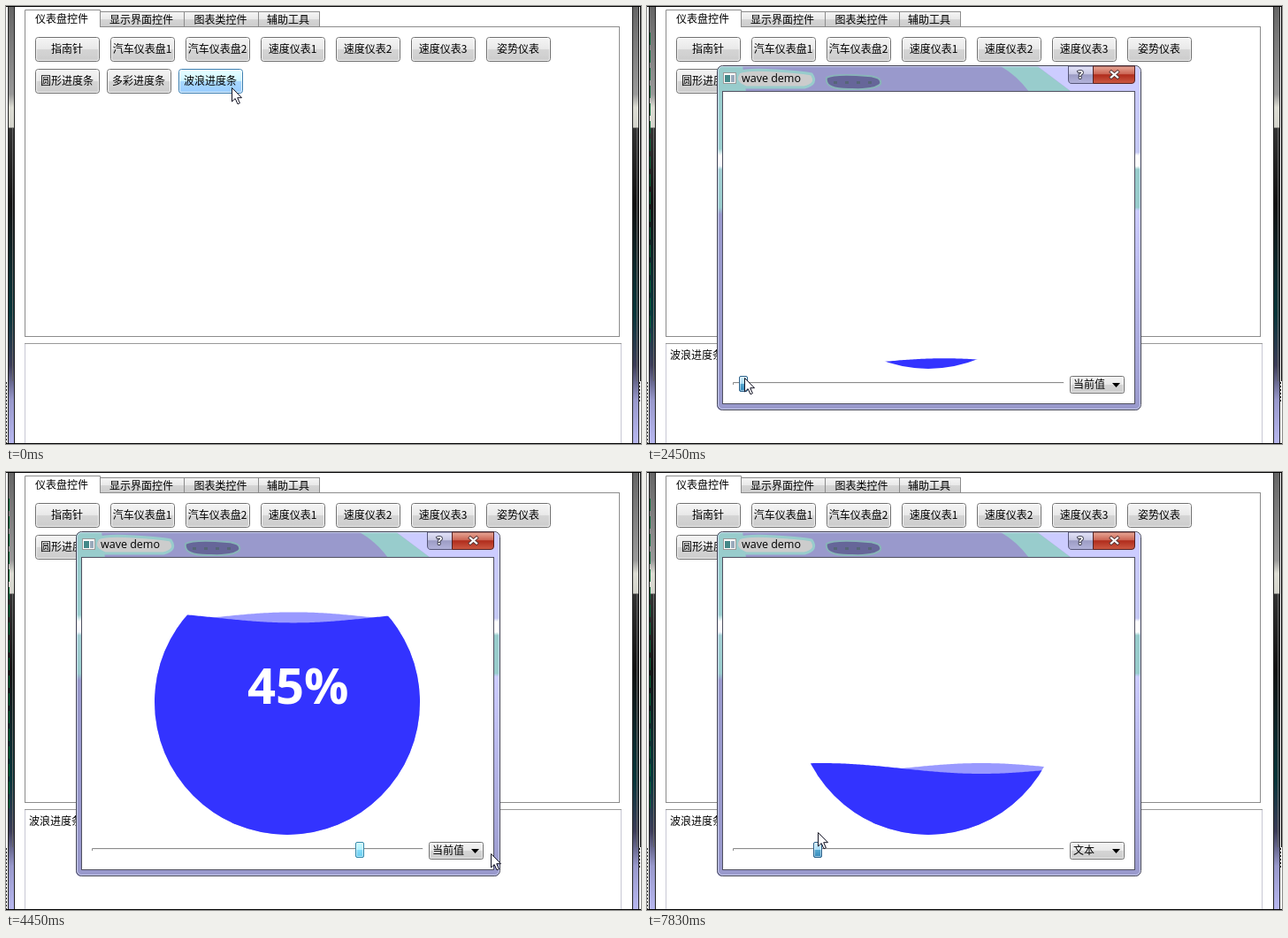
Recreate the animation shown at these times as an HTML page. Size 718 by 495 pixels, loop 8000 ms.

```html
<!DOCTYPE html>
<html lang="zh">
<head>
<meta charset="utf-8">
<title>wave demo</title>
<style>
  html, body { margin: 0; width: 100%; height: 100%; overflow: hidden; background: #fff; }
  svg { display: block; width: 718px; height: 495px; }
  text { font: 12px "Noto Sans CJK SC", "Noto Sans CJK", sans-serif; white-space: pre; }
  .caption { font: 12.5px "Open Sans", sans-serif; }
  .big { font: bold 56px "Open Sans", "Noto Sans CJK SC", sans-serif; fill: #fff; }
  .big.han { font: bold 55px "Noto Sans CJK SC", "Noto Sans CJK", sans-serif; }
</style>
</head>
<body>
<svg viewBox="0 0 718 495">
  <defs>
    <linearGradient id="plain" x2="0" y2="1">
      <stop stop-color="#f5f5f5"/><stop offset=".48" stop-color="#e9e9e9"/>
      <stop offset=".5" stop-color="#d5d5d5"/><stop offset="1" stop-color="#cccccc"/>
    </linearGradient>
    <linearGradient id="hot" x2="0" y2="1">
      <stop stop-color="#eaffff"/><stop offset=".48" stop-color="#ccf4ff"/>
      <stop offset=".5" stop-color="#a8d8ff"/><stop offset="1" stop-color="#99ccff"/>
    </linearGradient>
    <linearGradient id="glow" x2="0" y2="1">
      <stop stop-color="#ccffff"/><stop offset=".48" stop-color="#b4f0ff"/>
      <stop offset=".5" stop-color="#88dcf8"/><stop offset="1" stop-color="#66ccf0"/>
    </linearGradient>
    <linearGradient id="open" x2="0" y2="1">
      <stop stop-color="#d8f4fa"/><stop offset=".48" stop-color="#ccf2ff"/>
      <stop offset=".5" stop-color="#99cce0"/><stop offset="1" stop-color="#98cccc"/>
    </linearGradient>
    <linearGradient id="pressed" x2="0" y2="1">
      <stop stop-color="#d5effc"/><stop offset=".5" stop-color="#a8dcf5"/>
      <stop offset=".52" stop-color="#55a8d0"/><stop offset="1" stop-color="#3388bb"/>
    </linearGradient>
    <linearGradient id="red" x2="0" y2="1">
      <stop stop-color="#e8a898"/><stop offset=".45" stop-color="#cc6655"/>
      <stop offset=".5" stop-color="#b02c1c"/><stop offset="1" stop-color="#cc5a44"/>
    </linearGradient>
    <linearGradient id="help" x2="0" y2="1">
      <stop stop-color="#e4e4fa"/><stop offset=".45" stop-color="#c8c8e4"/>
      <stop offset=".5" stop-color="#9c9cc4"/><stop offset="1" stop-color="#b4b4dc"/>
    </linearGradient>
    <linearGradient id="edge" x2="0" y2="1">
      <stop stop-color="#666"/><stop offset=".2" stop-color="#999"/>
      <stop offset=".23" stop-color="#ddddd4"/><stop offset=".275" stop-color="#d4d4cc"/>
      <stop offset=".278" stop-color="#333"/><stop offset=".45" stop-color="#111"/>
      <stop offset=".62" stop-color="#0c2c30"/><stop offset=".7" stop-color="#06363a"/>
      <stop offset=".82" stop-color="#3c3c58"/><stop offset=".9" stop-color="#9999cc"/>
      <stop offset="1" stop-color="#b8b8f0"/>
    </linearGradient>
    <linearGradient id="side" x2="0" y2="1">
      <stop stop-color="#98cccc"/><stop offset=".24" stop-color="#9cd0d0"/>
      <stop offset=".26" stop-color="#fff"/><stop offset=".29" stop-color="#f4f8ff"/>
      <stop offset=".3" stop-color="#a4d0d4"/><stop offset=".41" stop-color="#98cccc"/>
      <stop offset=".43" stop-color="#9999cc"/><stop offset="1" stop-color="#9999cc"/>
    </linearGradient>
    <linearGradient id="sideRight" x2="0" y2="1">
      <stop stop-color="#ccccff"/><stop offset=".25" stop-color="#c4c8f4"/>
      <stop offset=".26" stop-color="#fff"/><stop offset=".29" stop-color="#fff"/>
      <stop offset=".3" stop-color="#98cccc"/><stop offset=".41" stop-color="#98cccc"/>
      <stop offset=".42" stop-color="#ccccff"/><stop offset="1" stop-color="#9999cc"/>
    </linearGradient>
    <clipPath id="disc"><circle cx="318" cy="260" r="150"/></clipPath>
    <clipPath id="frame"><rect x="79" y="68" width="479" height="389" rx="6"/></clipPath>
  </defs>

  <rect width="718" height="495" fill="#fff"/>
  <g id="page"></g>

  <g id="window">
    <g clip-path="url(#frame)">
      <rect x="79" y="67" width="480" height="391" fill="#9999cc"/>
      <rect x="79" y="68" width="8" height="389" fill="url(#side)"/>
      <rect x="551" y="68" width="8" height="389" fill="url(#sideRight)"/>
      <path d="M79 67H108L112 97H79Z" fill="#98cccc"/>
      <path d="M104 75Q112 71 145 73T186 77Q194 88 178 92L112 92Q96 86 104 75Z" fill="#cccccc" stroke="#98cccc" stroke-width="3"/>
      <path d="M398 67H440L480 97H432Q418 78 398 67Z" fill="#98cccc"/>
      <path d="M440 67H559V97H480Z" fill="#ccccff"/>
      <path d="M203 81Q212 76 250 79 266 80 264 88 258 95 232 94 200 95 203 81Z" fill="#666699" stroke="#88b4b8" stroke-width="2"/>
      <path d="M211 86.500H258" stroke="#556677" stroke-width="3" stroke-dasharray="4 9"/>
    </g>
    <rect x="79.5" y="67.5" width="479" height="389" rx="6" fill="none" stroke="#444455"/>
    <rect x="80.5" y="68.5" width="477" height="387" rx="5" fill="none" stroke="#e4ecff" stroke-opacity=".65"/>
    <rect x="85.5" y="96.5" width="466" height="353" fill="#fff" stroke="#505060"/>
    <rect x="86.5" y="75.5" width="14" height="12" fill="#fff" stroke="#999"/>
    <rect x="88" y="78" width="6" height="8" fill="#448888"/>
    <rect x="95" y="78" width="4" height="8" fill="#99aabb"/>
    <text class="caption" x="107" y="86">wave demo</text>
    <path d="M476.500 68V83Q476.500 87.500 480 87.500H504.500V68Z" fill="url(#help)" stroke="#555577"/>
    <path d="M504.500 68V87.500H548Q551.500 87.500 551.500 84V68Z" fill="url(#red)" stroke="#552222"/>
    <text x="487" y="82" style="font:bold 13px 'Open Sans',sans-serif" fill="#fff" stroke="#444455" stroke-width="2" paint-order="stroke">?</text>
    <g fill="none" stroke-linecap="square">
      <path d="M525 74.500 532 80.500M532 74.500 525 80.500" stroke="#553333" stroke-width="4"/>
      <path d="M525 74.500 532 80.500M532 74.500 525 80.500" stroke="#fff" stroke-width="2.300"/>
    </g>

    <g clip-path="url(#disc)">
      <path id="back" fill="#9999ff"/>
      <path id="front" fill="#3333ff"/>
    </g>
    <text id="value" class="big" x="273"></text>

    <path d="M97.500 428V425.500H471" fill="none" stroke="#8c8c8c"/>
    <path d="M98 426.500H471.500V425" fill="none" stroke="#f0f0f0"/>
    <g id="handle">
      <rect x="-4.500" y="418.500" width="9" height="17" rx="1.500"/>
      <rect x="-3.500" y="419.500" width="7" height="15" rx="1" fill="none" stroke="#fff" stroke-opacity=".5"/>
    </g>
    <g id="combo"></g>
    <g id="popup">
      <rect x="478.500" y="437.500" width="61" height="25" fill="#fff" stroke="#333"/>
      <rect id="choice" x="479" width="60" height="12" fill="#3399ff"/>
      <text x="482" y="448">当前值</text>
      <text x="482" y="460">文本</text>
    </g>
  </g>
  <path id="cursor" d="M.500 .500V16L4.200 12.600 7 18.800 9.400 17.700 6.700 11.700H11.500Z" fill="#fff" stroke="#112" stroke-width="1"/>
</svg>

<script>
const $ = id => document.getElementById(id);
const LOOP = 8000, AMPLITUDE = 6;

// The first layout is taller and wider than the one after the slider is used.
const firstLayout = { wavelength: 408, baseline: 301 };
const finalLayout = { wavelength: 360, baseline: 262 };

// time, cursor x, cursor y, slider handle x
const steps = [
  [0, 255, 92, 102], [100, 248, 92, 102], [410, 248, 92, 102], [750, 252, 71, 102],
  [1100, 260, 125, 102], [1440, 257, 78, 102], [1780, 215, 434, 102], [2130, 108, 429, 102],
  [2450, 110, 420, 109], [2790, 244, 415, 244], [3110, 363, 409, 364], [3460, 345, 409, 346],
  [3780, 247, 410, 248], [4130, 381, 411, 382], [4450, 548, 431, 400], [4800, 515, 424, 400],
  [5120, 508, 443, 400], [5460, 490, 456, 400], [5800, 475, 446, 400], [6150, 418, 408, 400],
  [6470, 400, 415, 400], [6810, 388, 424, 400], [7160, 331, 414, 331], [7480, 251, 409, 251],
  [7830, 193, 407, 193]
];

// step, x of the front wave's crest
const crestKeys = [[2, 798], [5, 270], [10, -820], [14, -1655], [18, -2342], [21, -2917], [24, -3402]];

function crestAt(step) {
  const i = Math.max(1, crestKeys.findIndex(key => key[0] >= step));
  const [a, from] = crestKeys[i - 1], [b, to] = crestKeys[i];
  return from + (to - from) * (step - a) / (b - a);
}

function wavePath(level, crest, wavelength) {
  let d = 'M160 420';
  for (let x = 160; x <= 476; x += 2)
    d += `L${x} ${(level - AMPLITUDE * Math.cos(2 * Math.PI * (x - crest) / wavelength)).toFixed(2)}`;
  return d + 'V420Z';
}

const box = (x, y, w, h, fill, stroke, rx = 0, extra = '') =>
  `<rect x="${x + .5}" y="${y + .5}" width="${w - 1}" height="${h - 1}" rx="${rx}" fill="${fill}" stroke="${stroke}" ${extra}/>`;

const label = (x, y, text, extra = '') => `<text x="${x}" y="${y}" ${extra}>${text}</text>`;

function button(x, y, text, id = '') {
  return box(x, y, 73, 28, 'url(#plain)', '#707070', 3, id && `id="${id}"`) +
    box(x + 1, y + 1, 71, 26, 'none', '#ffffffb0', 2) +
    label(x + 36, y + 18, text, 'text-anchor="middle"');
}

function buildPage() {
  let page = box(21, 23, 673, 351, '#fff', '#8c8c8c') + box(21, 381, 675, 130, '#fff', '#c8c8d4') +
    '<path d="M21 381.500H696" stroke="#999"/>';
  [['显示界面控件', 106, 96], ['图表类控件', 201, 85], ['辅助工具', 285, 70]].forEach(([text, x, w]) => {
    page += box(x, 6, w, 18, 'url(#plain)', '#8c8c8c') + label(x + (w - 12 * text.length) / 2 - 1, 20, text);
  });
  page += '<path d="M21.500 24V4.500H106.500V24" fill="#fff" stroke="#8c8c8c"/>' + label(33, 19, '仪表盘控件');
  ['指南针', '汽车仪表盘1', '汽车仪表盘2', '速度仪表1', '速度仪表2', '速度仪表3', '姿势仪表']
    .forEach((text, i) => page += button(33 + 85 * i, 35, text));
  ['圆形进度条', '多彩进度条', '波浪进度条']
    .forEach((text, i) => page += button(33 + 81 * i, 71, text, i === 2 ? 'waveButton' : ''));
  page += label(26, 399, '波浪进度条', 'id="log"');

  [2, 708].forEach(left => {
    page += `<rect x="${left}" y="1" width="7" height="494" fill="url(#edge)"/>
      <path d="M${left + .5} 1V494M${left + 7.5} 1V494" stroke="#222"/>
      <path d="M${left + 5.5} 138V424" stroke="#666"/>`;
  });
  page += `<path id="glint" d="M3.500 30V380" stroke="#006633" stroke-dasharray="14 6"/>
    <path d="M.500 425V494M716.500 425V448" stroke="#222" stroke-dasharray="2 2"/>
    <path d="M0 .500H718M0 494.500H718M717.500 0V424" stroke="#000"/>`;
  $('page').innerHTML = page;
  $('combo').innerHTML = box(478, 418, 62, 20, 'url(#plain)', '#707070', 2, 'id="comboBox"') +
    box(479, 419, 60, 18, 'none', '#ffffff90', 1) +
    label(482, 432, '', 'id="comboText"') + '<path d="M526 426H535L530.500 431Z"/>';
}

function paintHandle(step, x) {
  const pressed = (step >= 8 && step <= 13) || step >= 22;
  const idle = step >= 16 && step <= 20;
  const knob = $('handle').firstElementChild;
  knob.setAttribute('fill', `url(#${pressed ? 'pressed' : idle ? 'plain' : 'glow'})`);
  knob.setAttribute('stroke', pressed ? '#2c628b' : idle ? '#707070' : '#3388aa');
  $('handle').setAttribute('transform', `translate(${x})`);
}

function show(step) {
  const [, cursorX, cursorY, handleX] = steps[step];
  const visible = (id, on) => $(id).style.display = on ? '' : 'none';
  const { wavelength, baseline } = step < 8 ? firstLayout : finalLayout;
  const level = step < 8 ? 275 : 410 - 300 * (handleX - 102) / 364;
  const crest = crestAt(step);

  $('cursor').setAttribute('transform', `translate(${cursorX} ${cursorY})`);
  $('waveButton').setAttribute('fill', step < 2 ? 'url(#hot)' : 'url(#plain)');
  $('waveButton').setAttribute('stroke', step < 2 ? '#3c7fb1' : '#707070');
  visible('log', step >= 2);
  visible('glint', step >= 2);
  visible('window', step >= 2);
  if (step < 2) return;

  $('window').setAttribute('transform', step < 5 ? 'translate(3 47)' : '');
  $('front').setAttribute('d', wavePath(level, crest, wavelength));
  $('back').setAttribute('d', wavePath(level, crest + wavelength / 2, wavelength));

  const han = step >= 19;
  $('value').textContent = han ? '帅' : '45%';
  $('value').classList.toggle('han', han);
  $('value').setAttribute('y', baseline);

  paintHandle(step, handleX);
  const comboHot = step >= 15 && step <= 18;
  $('comboBox').setAttribute('fill', comboHot ? 'url(#open)' : 'url(#plain)');
  $('comboBox').setAttribute('stroke', comboHot ? '#3c7fb1' : '#707070');
  $('comboText').textContent = step >= 18 ? '文本' : '当前值';
  visible('popup', step === 16 || step === 17);
  $('choice').setAttribute('y', step === 17 ? 450 : 438);
}

buildPage();
let current = -1;
const start = performance.now();

function tick() {
  const time = (performance.now() - start) % LOOP;
  const step = steps.filter(entry => entry[0] <= time).length - 1;
  if (step !== current) show(current = step);
  requestAnimationFrame(tick);
}
tick();
</script>
</body>
</html>
```
